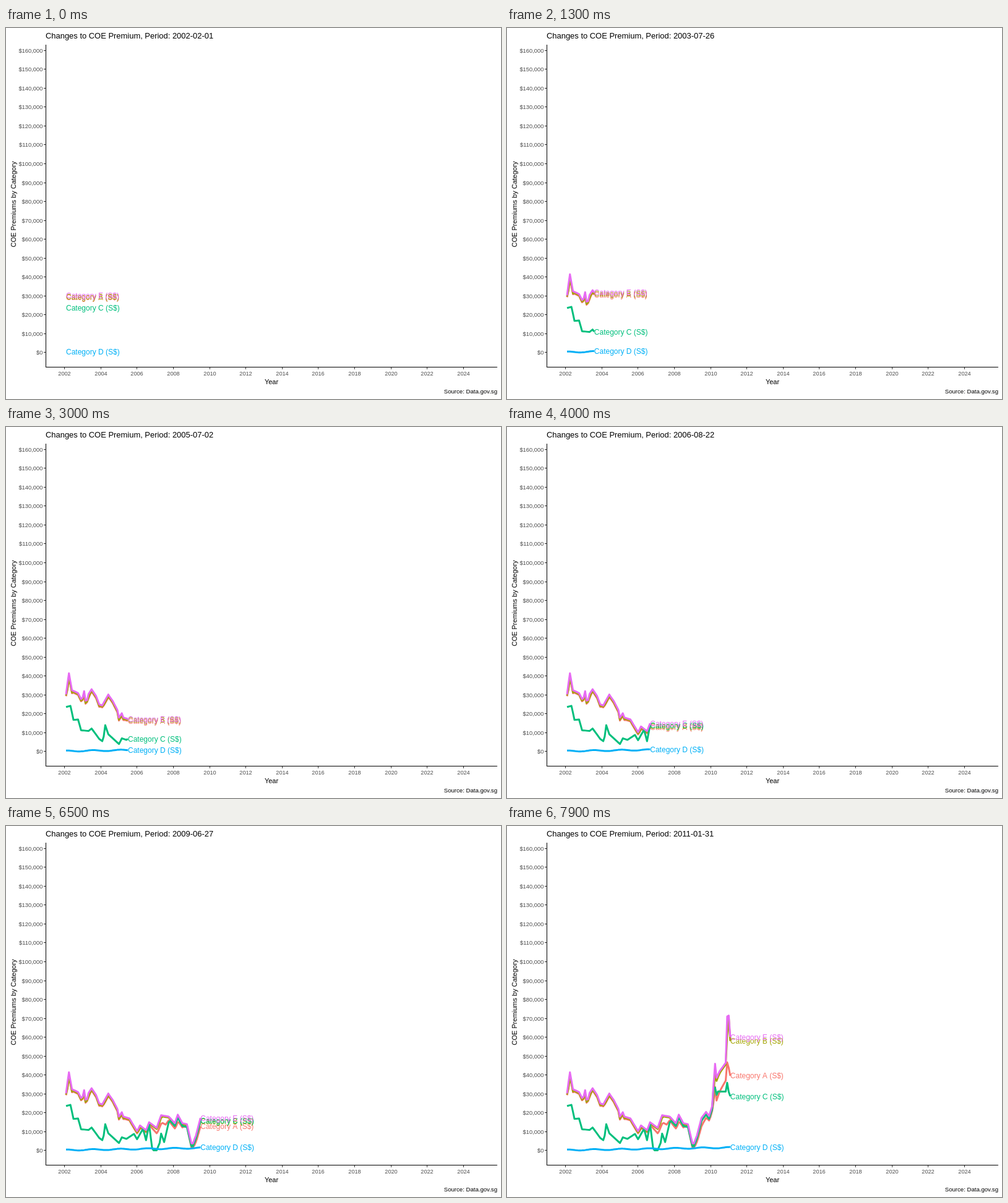
An HTML page with a canvas that plays this animation: 800x600 px, repeating every 8000 ms.

```html
<!DOCTYPE html>
<html lang="en">
<head>
<meta charset="utf-8">
<title>Changes to COE Premium</title>
<style>
html, body { margin: 0; width: 100%; height: 100%; overflow: hidden; background: #fff; }
canvas { display: block; }
</style>
</head>
<body>
<canvas id="stage" width="800" height="600"></canvas>
<script>
const ctx = document.getElementById('stage').getContext('2d');
const FRAMES = 80, FRAME_MS = 100, DAYS_PER_FRAME = 41.597, MONTHS = 109;
const DAY = 864e5, START = Date.UTC(2002, 1, 1);

const dayOf = (year, month) => (Date.UTC(year, month, 1) - START) / DAY;
const days = Array.from({ length: MONTHS }, (_, m) => dayOf(2002, 1 + m));
const xOf = day => 97 + day * 645 / 8036;
const yOf = thousands => 524.9 - thousands * 3.0538;

// Linear value at month m between [month, value] key points
function at(keys, m) {
  const i = keys.findIndex(k => k[0] >= m);
  if (i < 1) return keys[0][1];
  const [m0, v0] = keys[i - 1], [m1, v1] = keys[i];
  return v0 + (v1 - v0) * (m - m0) / (m1 - m0);
}

// Turning points, in thousands of dollars
const keysE = [[0, 30.2], [2, 41.5], [4, 32.5], [8, 31], [10, 27.8], [11, 28.5], [12, 32],
  [13, 27], [14, 27.2], [15, 30.5], [17, 33], [20, 29.3], [22, 25], [24, 24.4], [28, 30.2],
  [31, 26.7], [34, 22], [35, 18], [37, 20.3], [38, 18], [42, 17], [47, 10.3], [49, 13.3],
  [53, 10.8], [55, 15], [60, 12], [63, 18.7], [68, 18], [72, 14.5], [74, 19], [77, 14.5],
  [80, 14], [83, 3.8], [84, 3.8], [86, 8], [89, 17.3], [92, 20.5], [94, 18.3], [96, 23.5],
  [98, 46], [99, 38.5], [101, 42], [105, 46.5], [106, 71], [107, 71.5], [108, 60.2]];
const keysC = [[0, 23.6], [3, 24.2], [5, 16.8], [8, 17], [10, 11.3], [15, 10.9], [17, 12.2],
  [22, 6.7], [24, 5.5], [25, 8], [26, 14], [28, 9.2], [35, 4], [37, 7], [40, 6.2], [45, 8.8],
  [47, 6], [51, 11.5], [53, 5.5], [55, 14], [57, 1.2], [58, .1], [60, .1], [62, 4], [63, 9],
  [65, 4.5], [68, 15]];
const gapAB = [[0, .4], [54, .5], [66, 4], [68, 1.5], [74, 2.5], [80, .5], [90, 3], [96, 1],
  [99, 10.4], [105, 8.5], [106, 14], [107, 27], [108, 18.4]];

const catE = m => at(keysE, m);
const jump = m => catE(m) - catE(m - 1);
// B trails E, most of all when E rises sharply
const catB = m => catE(m) - .5 - Math.max(.4 * jump(m), -.15 * jump(m));
const catA = m => catB(m) - at(gapAB, m);
// C later follows E up to a ceiling
const catC = m => m <= 68 ? at(keysC, m) : Math.min(catE(m) - 1.5, 31 + .2 * jump(m));
const catD = m => .25 + .0125 * m + .3 * Math.cos(.35 * m);

const series = [
  ['A', '#F8766D', catA],
  ['B', '#A3A500', catB],
  ['C', '#00BF7D', catC],
  ['D', '#00B0F6', catD],
  ['E', '#E76BF3', catE]
];

function text(str, x, y, size, color = '#000', align = 'left') {
  ctx.font = `${size}px "Liberation Sans", Arial, sans-serif`;
  ctx.fillStyle = color;
  ctx.textAlign = align;
  ctx.fillText(str, x, y);
}

function box(x, y, w, h, color) {
  ctx.fillStyle = color;
  ctx.fillRect(x, y, w, h);
}

function drawAxes() {
  for (let k = 0; k <= 160; k += 10) {
    const y = Math.floor(yOf(k));
    box(61, y, 3, 1, '#333');
    text(k ? `$${k},000` : '$0', 59.5, y + 4, 9.4, '#4D4D4D', 'right');
  }
  for (let year = 2002; year <= 2024; year += 2) {
    const x = Math.floor(xOf(dayOf(year, 0)));
    box(x, 549, 1, 3, '#333');
    text(year, x + .5, 562, 9.2, '#4D4D4D', 'center');
  }
  box(64, 27, 1, 522, '#000');
  box(64, 548, 730, 1, '#000');
  text('Year', 429, 576, 11, '#000', 'center');
  text('Source: Data.gov.sg', 794, 591, 9.6, '#000', 'right');
  ctx.save();
  ctx.translate(15.5, 285);
  ctx.rotate(-Math.PI / 2);
  text('COE Premiums by Category', 0, 0, 11, '#000', 'center');
  ctx.restore();
}

function draw(step) {
  box(0, 0, 800, 600, '#fff');
  drawAxes();
  const date = new Date(START + Math.floor(step * DAYS_PER_FRAME) * DAY);
  text('Changes to COE Premium, Period: ' + date.toISOString().slice(0, 10), 64, 17, 12.95);

  // Each month appears on the step nearest to its date
  const shown = days.filter(d => Math.round(d / DAYS_PER_FRAME) <= step).length;
  ctx.lineWidth = 3;
  ctx.lineJoin = 'round';
  for (const [, color, value] of series) {
    ctx.strokeStyle = color;
    ctx.beginPath();
    for (let m = 0; m < shown; m++) ctx.lineTo(xOf(days[m]), yOf(value(m)));
    ctx.stroke();
  }
  const last = shown - 1;
  for (const [name, color, value] of series)
    text(`Category ${name} (S$)`, xOf(days[last]), Math.round(yOf(value(last)) + 4.5), 12, color);
}

function tick() {
  draw(Math.floor(performance.now() / FRAME_MS) % FRAMES);
  requestAnimationFrame(tick);
}
tick();
</script>
</body>
</html>
```
